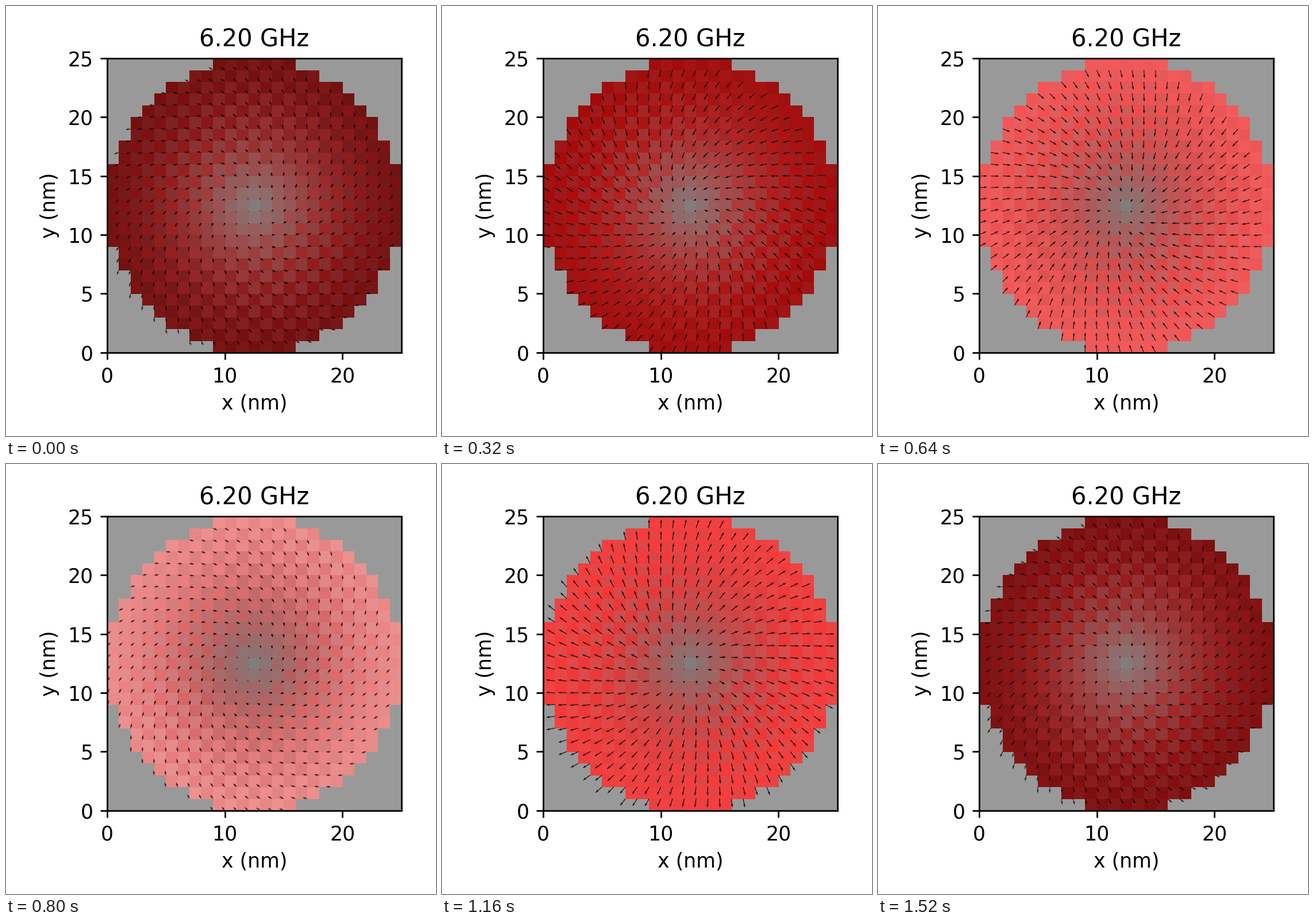
Animation of 748 by 748 pixels, one loop 1560 ms. Source, as a matplotlib script:

```python
import numpy as np
import matplotlib.pyplot as plt
from matplotlib.animation import FuncAnimation

SIZE, DPI = 748, 250
FRAMES, STEP_MS = 39, 40
CELLS = 25
LEFT, TOP, SIDE = 175.9, 91.0, 511.7   # axes box in pixels

plt.rcParams["font.family"] = "DejaVu Sans"

# Disc of unit cells, in polar coordinates about the middle cell
i, j = np.meshgrid(np.arange(CELLS), np.arange(CELLS))
dx, dy = i - 12, j - 12
r = np.hypot(dx, dy)
theta = np.arctan2(dy, dx)
disc = r <= 12.5

profile = np.tanh(r / 8) / np.tanh(12.5 / 8)
swing = np.tanh(r / 3.5)
checker = np.where((i + j) % 2, 1, -1)
ripple = checker * 0.28 * (1 - (r / 14) ** 2) * r / (r + 1)


def phase(n, start):
    return 2 * np.pi * (n - start) / FRAMES


def moment(n):
    """In-plane arrows in pixels: radial and azimuthal parts a quarter turn apart."""
    radial = -17 * np.sin(phase(n, 2.6)) * swing
    around = 7.2 * np.cos(phase(n, 3.0)) * swing
    u = radial * np.cos(theta) - around * np.sin(theta)
    v = radial * np.sin(theta) + around * np.cos(theta)
    return u[disc], v[disc]


def tint(n):
    """Lightness follows the out-of-plane part, saturation the amplitude."""
    axis = np.radians(132 + 35 * np.cos(2 * phase(n, 5)))
    sat_ripple = 1 + ripple * np.cos(theta - axis)
    light_ripple = 1 + ripple * np.cos(theta - axis + np.radians(50))

    light = 0.5 - 0.25 * np.cos(phase(n, 2.3)) * profile**2 * light_ripple
    sat = (0.67 + 0.22 * np.sin(phase(n, 2.5)) ** 2) * profile * sat_ripple
    sat = np.clip(sat + 0.02, 0, 1)
    half = sat * (1 - np.abs(2 * light - 1)) / 2

    rgba = np.zeros((CELLS, CELLS, 4))
    rgba[..., 0] = light + half
    rgba[..., 1] = rgba[..., 2] = light - half
    rgba[..., 3] = disc
    return np.clip(rgba, 0, 1), light


def ink(light):
    rgba = np.zeros((disc.sum(), 4))
    rgba[:, 3] = 1 - 1.2 * np.abs(light[disc] - 0.5)
    return rgba


fig = plt.figure(figsize=(SIZE / DPI, SIZE / DPI), dpi=DPI, facecolor="white")
ax = fig.add_axes([LEFT / SIZE, 1 - (TOP + SIDE) / SIZE, SIDE / SIZE, SIDE / SIZE])
ax.set_facecolor("#999999")
ax.set_title("6.20 GHz", fontsize=12)
ax.set_xlabel("x (nm)", fontsize=10)
ax.set_ylabel("y (nm)", fontsize=10)

cells = ax.imshow(tint(0)[0], origin="lower", extent=(0, CELLS, 0, CELLS),
                  interpolation="nearest", aspect="auto")
arrows = ax.quiver(i[disc], j[disc], *moment(0), units="width", width=0.0024,
                   scale_units="dots", scale=1, pivot="tail")
ax.set(xlim=(0, CELLS), ylim=(0, CELLS),
       xticks=[0, 10, 20], yticks=range(0, 26, 5))


def draw(n):
    rgba, light = tint(n)
    cells.set_data(rgba)
    arrows.set_UVC(*moment(n))
    arrows.set_facecolor(ink(light))
    return cells, arrows


anim = FuncAnimation(fig, draw, frames=FRAMES, interval=STEP_MS,
                     init_func=lambda: draw(0), repeat=True, repeat_delay=0)
plt.show()
```
